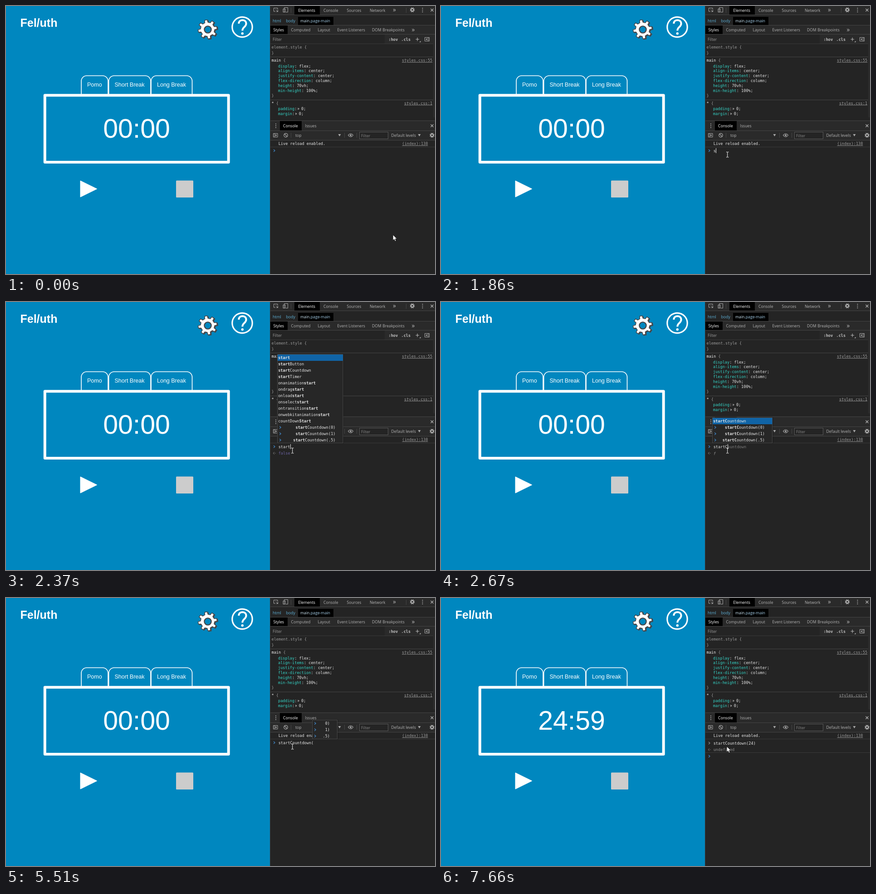
An HTML page that plays this animation: 946x592 px, repeating every 8000 ms.

```html
<!DOCTYPE html>
<html lang="en">
<head>
<meta charset="utf-8">
<title>Timer and console</title>
<style>
  html, body { margin: 0; width: 100%; height: 100%; overflow: hidden; background: #242424; }
  svg { display: block; width: 946px; height: 592px; }
  text { white-space: pre; }
  .m { font: 8.6px "DejaVu Sans Mono", monospace; }
  .u { font: 8.7px "Open Sans", "Noto Sans", sans-serif; }
  .a { font: 12.5px "Liberation Sans", Arial, sans-serif; }
  .title { font: bold 25px "Liberation Sans", Arial, sans-serif; }
  .clock { font: 59px "Liberation Sans", Arial, sans-serif; text-anchor: middle; }
  .big { font-size: 14px; }
  .b { font-weight: bold; }
  .i { font-style: italic; }
  .end { text-anchor: end; }
  .link { text-decoration: underline; }
</style>
</head>
<body>
<svg viewBox="0 0 946 592">
  <g id="page"></g>
  <g id="tools"></g>
  <g id="live"></g>
  <g id="pointer"></g>
</svg>
<script>
const LOOP = 8000, CHAR = 5.177, LEFT = 600.7;
const INK = '#e6e6e6', DIM = '#9a9a9a', LINE = '#454545', BAR = '#2a2a2a', BLUE = '#4594de', SKY = '#0087bf';
const $ = id => document.getElementById(id);
const esc = s => s.replace(/&/g, '&amp;').replace(/</g, '&lt;');
const text = (x, y, s, fill = INK, cls = 'm') => `<text x="${x}" y="${y}" fill="${fill}" class="${cls}">${s}</text>`;
const rect = (x, y, w, h, fill, more = '') => `<rect x="${x}" y="${y}" width="${w}" height="${h}" fill="${fill}" ${more}/>`;
const stroke = (d, color, w = 1, more = '') => `<path d="${d}" fill="none" stroke="${color}" stroke-width="${w}" ${more}/>`;
const fillPath = (d, color, more = '') => `<path d="${d}" fill="${color}" ${more}/>`;
const dot = (x, y, r, fill, more = '') => `<circle cx="${x}" cy="${y}" r="${r}" fill="${fill}" ${more}/>`;
const chevron = (x, y, color) => stroke(`M${x} ${y - 2.6}l3 2.6-3 2.6`, color, 1.1);
const reply = y => stroke(`M592 ${y - 2.4}l-2.8 2.4 2.8 2.4`, '#8a8a8a') + dot(593.8, y, .7, '#8a8a8a');
const cross = (x, y) => stroke(`M${x - 3} ${y - 3}l6 6m0-6l-6 6`, '#b5b5b5', 1.2);
const more = (x, y) => [-4, 0, 4].map(d => dot(x, y + d, 1, '#b5b5b5')).join('');
const down = (x, y) => fillPath(`M${x - 3} ${y - 2.5}h6l-3 5z`, '#a8a8a8');

function gearPath(cx, cy, outer, inner, teeth, turn) {
  const pts = [], step = 2 * Math.PI / teeth;
  for (let k = 0; k < teeth; k++) {
    for (const [off, r] of [[-.29, inner], [-.17, outer], [.17, outer], [.29, inner]]) {
      const a = turn + (k + off) * step;
      pts.push((cx + r * Math.cos(a)).toFixed(2) + ' ' + (cy + r * Math.sin(a)).toFixed(2));
    }
  }
  return 'M' + pts.join('L') + 'z';
}
const smallGear = (x, y) =>
  fillPath(gearPath(x, y, 5.6, 4, 8, .39), '#adadad') + dot(x, y, 1.8, BAR);

function drawPage() {
  const tab = (x, w) => stroke(`M${x} 195V166a12 12 0 0 1 12-12h${w - 24}a12 12 0 0 1 12 12V195`, '#fff', 1.7);
  const gear = gearPath(444.5, 51.5, 21, 15.5, 8, -1.745);
  $('page').innerHTML =
    rect(0, 0, 582, 592, SKY) +
    text(31.5, 46, 'Fel/uth', '#fff', 'title') +
    fillPath(gear, '#46484c', 'transform="translate(1.8 1.2)" stroke="#46484c" stroke-width="1.5"') +
    `<path d="${gear}" fill="#fff" stroke="#46484c" stroke-width="1.5" stroke-linejoin="round"/>` +
    dot(445, 52, 7.6, SKY, 'stroke="#46484c" stroke-width="2.4"') +
    dot(521, 46.5, 22.2, 'none', 'stroke="#fff" stroke-width="3.2"') +
    stroke('M513.3 39C513.3 28.5 529.6 28.5 529.6 39C529.6 46.5 521.3 46 521.3 54.5', '#fff', 4) +
    dot(521.3, 60.8, 2.7, '#fff') +
    tab(166, 59) + tab(226.6, 92.4) + tab(320, 90.5) +
    text(179, 178, 'Pomo', '#fff', 'a') +
    text(239.5, 178, 'Short Break', '#fff', 'a') +
    text(333, 178, 'Long Break', '#fff', 'a') +
    rect(85.7, 197.2, 405, 147.8, 'none', 'stroke="#fff" stroke-width="6" stroke-linejoin="round"') +
    fillPath('M164 386V422L200.5 404z', '#fff', 'stroke="#fff" stroke-linejoin="round"') +
    rect(375, 385.5, 38, 37.5, '#ccc', 'rx="1.5"');
}

function drawTools() {
  const ui = (x, y, s, fill = '#b4b4b4') => text(x, y, s, fill, 'u');
  const row = (y, color = LINE) => rect(583, y, 363, 1, color);
  const sep = (x, y) => rect(x, y, 1, 11, LINE);
  const chevrons = (x, y) => text(x, y, '»', '#b4b4b4', 'u big');
  const rule = (y, name, value) =>
    text(600, y, `<tspan fill="#35d4c7">${name}</tspan>: ${value};`);
  const short = (y, name) =>
    text(600, y, `<tspan fill="#35d4c7">${name}</tspan>:`) +
    fillPath(`M${600 + CHAR * (name.length + 1) + 2} ${y - 5.5}l4 2.6-4 2.6z`, '#909090') +
    text(600 + CHAR * (name.length + 1) + 9.5, y, '0;');
  const link = (x, y, s) => text(x, y, s, DIM, 'm link');
  const flex = [['display', 'flex'], ['align-items', 'center'], ['justify-content', 'center'],
    ['flex-direction', 'column'], ['height', '70vh'], ['min-height', '100%']];

  $('tools').innerHTML =
    rect(582, 0, 364, 592, '#242424') + rect(582, 0, 1, 592, '#383838') +
    // main tabs
    rect(583, 0, 363, 19, BAR) + row(19) +
    stroke('M594 12h-3.5V4.5h8.5V8M594.5 7.5l5 5m0-3.6V12.5h-3.6', '#a8a8a8') +
    stroke('M613.5 13.5V3.5h8V6M611 6.5h5v7h-5zM617 13.5h4.5V6', '#a8a8a8') + sep(628, 4) +
    rect(636, 0, 56, 19, '#000') + ui(644.5, 12.5, 'Elements', '#fff') +
    ui(700, 12.5, 'Console') + ui(751.5, 12.5, 'Sources') + ui(802, 12.5, 'Network') +
    chevrons(853, 13) + sep(882, 4) +
    smallGear(896, 8.5) + more(918.5, 9) + cross(939.5, 9) +
    // breadcrumbs
    rect(644, 24, 78, 18, '#000') +
    ui(588, 36, 'html', '#5db0d7') + ui(617.5, 36, 'body', '#5db0d7') +
    ui(649, 36, 'main<tspan fill="#a9d3ee">.page-main</tspan>', '#d3ecfa') +
    // sidebar tabs
    rect(583, 42, 363, 20, BAR) + row(42) + rect(583, 43, 38, 19, '#000') +
    ui(589.5, 56, 'Styles', '#fff') + ui(628.5, 56, 'Computed') + ui(687.5, 56, 'Layout') +
    ui(730.5, 56, 'Event Listeners') + ui(807, 56, 'DOM Breakpoints') +
    chevrons(894.5, 57) + row(62) +
    rect(835, 63, 111, 20, BAR) + row(83, '#3a3a3a') +
    ui(588, 77, 'Filter', DIM) + text(843.5, 76.5, ':hov', '#c4c4c4', 'm b') +
    text(871.5, 76.5, '.cls', '#c4c4c4', 'm b') +
    stroke('M903.5 73.5h7.5M907.2 69.7v7.5', '#b5b5b5', 1.2) + fillPath('M914.5 77v3h-3z', '#b5b5b5') +
    stroke('M923.5 69.5h10v8h-10zM931 69.5v8', '#a8a8a8') + fillPath('M928.5 71v5l-3.2-2.5z', '#a8a8a8') +
    // style rules
    text(585.5, 94, 'element.style {', DIM) + text(585.5, 106.5, '}', DIM) + row(112) +
    text(585.5, 123, 'main <tspan fill="#9a9a9a">{</tspan>', '#eee') + link(873, 123, 'styles.css:55') +
    flex.map(([n, v], i) => rule(135.5 + 10.9 * i, n, v)).join('') +
    text(585.5, 201, '}', DIM) + row(207) +
    text(585.5, 217.5, '* <tspan fill="#9a9a9a">{</tspan>', '#eee') + link(878, 217.5, 'styles.css:1') +
    short(230, 'padding') + short(241, 'margin') +
    rect(942, 63, 4, 183, '#2b2b2b') +
    // drawer
    row(253) + rect(583, 254, 363, 42, BAR) + row(275) +
    more(595, 264.5) + rect(604, 254, 48, 21, '#000') +
    ui(611, 268, 'Console', '#fff') + ui(659.5, 268, 'Issues') + cross(939.5, 264.5) +
    stroke('M589.5 281.5h9.5v8h-9.5zM592 281.5v8', '#a8a8a8') + fillPath('M594 283v5l3.5-2.5z', '#a8a8a8') +
    dot(617, 285.5, 4.2, 'none', 'stroke="#a8a8a8" stroke-width="1.2"') + stroke('M614 282.5l6 6', '#a8a8a8', 1.2) +
    sep(628, 280) + ui(638, 289, 'top') + down(735.5, 285.5) + sep(746, 280) +
    stroke('M754.5 285.5Q760 278.5 765.5 285.5Q760 292.5 754.5 285.5z', '#a8a8a8', 1.2) + dot(760, 285.5, 1.9, '#a8a8a8') +
    sep(773, 280) + rect(779.5, 278.5, 63, 15, '#242424', 'stroke="#585858"') +
    ui(783, 289.5, 'Filter', '#858585') + ui(849.5, 289, 'Default levels') + down(911.5, 285.5) +
    smallGear(939.5, 285.5) + row(296) +
    text(LEFT, 307, 'Live reload enabled.') + link(873.5, 307, '(index):138') + row(311, '#3a3a3a');
}

// completion lists: query, edges, names, past commands
const past = ['startCountdown(0)', 'startCountdown(1)', 'startCountdown(.5)'];
const lists = {
  s: { q: 's', right: 822, names: ('start startButton startCountdown startTimer screen screenLeft screenTop ' +
      'screenX screenY scroll scrollBy scrollTo scrollX scrollY scrollbars self sessionStorage ' +
      'setInterval setTimeout speechSynthesis').split(' ') },
  start: { q: 'start', right: 743, past, names: ('start startButton startCountdown startTimer onanimationstart ondragstart ' +
      'onloadstart onselectstart ontransitionstart onwebkitanimationstart countDownStart').split(' ') },
  count: { right: 730.5, past, names: ['startCountdown'] },
  args: { left: 675.5, right: 730.5, q: '', names: [], past: ['0)', '1)', '.5)'] }
};

function mark(s, q) {
  const at = s.toLowerCase().indexOf(q.toLowerCase());
  if (!q || at < 0) return esc(s);
  const end = at + q.length;
  return `${esc(s.slice(0, at))}<tspan class="b">${esc(s.slice(at, end))}</tspan>${esc(s.slice(end))}`;
}

function popup(key, typed) {
  if (key === 'hint')
    return rect(675.5, 296.5, 52, 15, '#272727', 'stroke="#4a4a4a"') + text(683, 307, 'minutes', INK, 'm b');
  const { q = typed, left = 598.5, right, names, past = [] } = lists[key];
  const n = names.length + past.length, top = 311 - 14 * n;
  let out = rect(left - 1, top - 1, right - left + 3, 14 * n + 3, '#000', 'opacity=".2"') +
    rect(left, top + .5, right - left, 14 * n, '#272727', 'stroke="#4a4a4a"');
  if (names.length) out += rect(left + .5, top + 1, right - left - .5, 14, '#1064a6');
  names.forEach((s, i) => out += text(left + 1.7, top + 11 + 14 * i, mark(s, q)));
  past.forEach((s, i) => {
    const y = top + 11 + 14 * (names.length + i);
    out += chevron(left + 4.7, y - 3, BLUE) + text(right - 16.5, y, mark(s, q), INK, 'm end');
  });
  return out;
}

// start, typed text, caret, list, faded completion, preview
const steps = [
  [0, '', 0],
  [680, '', 1],
  [1200, '', 0],
  [1720, '', 1],
  [1860, 's', 1],
  [1940, 's', 1, 's', 'tart', 'false'],
  [2370, 'start', 1, 'start', '', 'false'],
  [2630, 'startC', 1, 'count', 'ountdown', 'false'],
  [2670, 'startC', 1, 'count', 'ountdown', 'f'],
  [2870, 'startCoun', 1, 'count', 'tdown', 'f'],
  [3320, 'startCount', 1, 'count', 'down', 'f'],
  [3810, 'startCount', 0, 'count', 'down', 'f'],
  [4260, 'startCountdown', 1, '', '', 'f'],
  [4790, 'startCountdown', 0, '', '', 'f'],
  [5010, 'startCountdown(', 1, 'args'],
  [5510, 'startCountdown(', 0, 'args'],
  [5640, 'startCountdown(2', 1],
  [5690, 'startCountdown(2', 1, 'hint'],
  [5740, 'startCountdown(24', 1, 'hint'],
  [6200, 'startCountdown(24)', 1, 'hint'],
  [6240, 'startCountdown(24)', 1],
  [6730, 'startCountdown(24)', 0],
  [7130, '', 1],
  [7170, '', 1],
  [7660, '', 0]
];

function drawLive([time, typed, caret, list, ghost = '', preview]) {
  const sent = time >= 7130, base = sent ? 352.5 : 322.5;
  let out = text(288, 291, time >= 7170 ? '24:59' : '00:00', '#fff', 'clock');
  if (sent) {
    out += chevron(590, 320.5, '#9a9a9a') + text(LEFT, 323.5, 'startCountdown(24)') +
      reply(335) + text(LEFT, 338, 'undefined', '#8c8c8c') + rect(583, 341, 363, 1, '#3a3a3a');
  }
  out += chevron(590, base - 3, BLUE);
  out += text(LEFT, base, `${typed}<tspan fill="#7b7b7b">${ghost}</tspan>`);
  if (caret) out += rect(Math.floor(LEFT + typed.length * CHAR + .5), base - 8.5, 1, 11, '#e8e8e8');
  if (preview) {
    out += reply(334);
    out += preview === 'f' ? text(LEFT, 337.5, 'f', '#909090', 'm i') : text(LEFT, 337, preview, '#6a61a0');
  }
  if (list) out += popup(list, typed);
  $('live').innerHTML = out;
}

function drawPointer(t) {
  const beam = t >= 720 && t < 7130;
  const tick = t < 20 ? 0 : 20 + 40 * Math.floor((t - 20) / 40);
  const p = Math.min(1, tick / 580), e = p * p * (3 - 2 * p);
  const x = 853.3 - 223 * e, y = 505.5 - 177.5 * e;
  $('pointer').innerHTML = beam
    ? stroke('M629 322.5h2l.7.6.7-.6h2M631.7 323v10.5M629 334h2l.7-.6.7.6h2', '#fff', 1)
    : (t >= 600 && t < 720 ? dot(629.5, 328, 9.3, '#9b950f') : '') +
      fillPath('M0 0V12.2L2.8 9.6L4.8 14L6.8 13.1L4.9 8.8H8.6z', '#fff',
        `stroke="#111" stroke-width=".7" transform="translate(${x} ${y})"`);
}

let shown = -1;
function frame(now) {
  const t = (now - start + LOOP) % LOOP;
  let k = steps.length - 1;
  while (k > 0 && steps[k][0] > t) k--;
  if (k !== shown) drawLive(steps[shown = k]);
  drawPointer(t);
  requestAnimationFrame(frame);
}

drawPage();
drawTools();
const start = performance.now();
frame(start);
</script>
</body>
</html>
```
